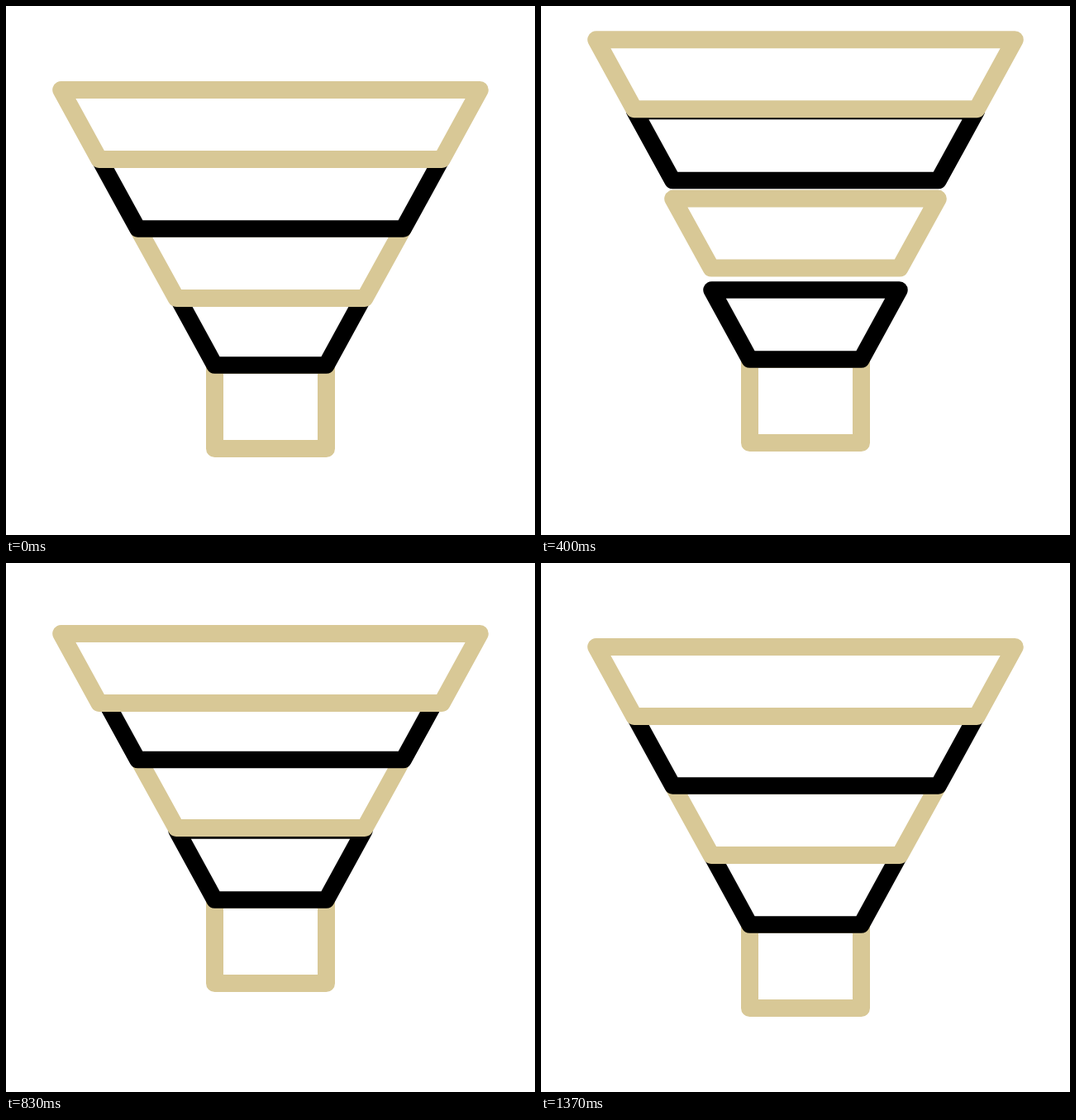
Recreate the animation shown at these times as an HTML page. Size 640 by 640 pixels, loop 1670 ms.

```html
<!DOCTYPE html>
<html lang="en">
<head>
<meta charset="utf-8">
<title>Bouncing funnel</title>
<style>
  html, body { margin: 0; width: 100%; height: 100%; overflow: hidden; background: #fff; }
  svg { display: block; width: 100%; height: 100%; }
  path { fill: #fff; stroke-linejoin: round; }
</style>
</head>
<body>
<svg id="stage" viewBox="0 0 640 640"></svg>
<script>
const LOOP = 1670, FRAME = 100 / 3;
const TAN = '#d8c896', BLACK = '#000';

// Painted bottom to top: half widths and heights of each section, delay in frames
const sections = [
  { top: 67.5, bottom: 67.5, y: 437.5, h: 101, color: TAN, delay: 0 },
  { top: 113.5, bottom: 67.5, y: 353.5, h: 84, color: BLACK, delay: 0 },
  { top: 160.3, bottom: 114, y: 269.5, h: 84, color: TAN, delay: 1.3 },
  { top: 206.8, bottom: 160.7, y: 185.4, h: 84, color: BLACK, delay: 3.3 },
  { top: 253.3, bottom: 207.3, y: 101.5, h: 84, color: TAN, delay: 5.7 }
];

// Two hops, the second half as high: [frame, offset]
const hops = [
  [-1.2, 0], [0, -3], [2.3, -6.8], [4.7, -43.5], [6.3, -60.8], [7.3, -64],
  [8, -62.8], [8.7, -58.3], [10.3, -44], [10.7, -36.4], [12, -10], [12.7, -6.3],
  [14.6, 1.3], [16, -2.5], [19.3, -16], [21.7, -31.3], [22.8, -34], [23.7, -33],
  [25, -30], [25.3, -28.2], [27.7, -13], [29.7, -4.3], [31, -0.5], [35.3, 0]
];

const slope = i => (hops[i + 1][1] - hops[i][1]) / (hops[i + 1][0] - hops[i][0]);

// Monotone tangents keep the curve from overshooting its points
const tangents = hops.map((_, i) => {
  if (i === 0 || i === hops.length - 1) return 0;
  const a = slope(i - 1), b = slope(i);
  return a * b <= 0 ? 0 : 2 * a * b / (a + b);
});

function offset(t) {
  const last = hops.length - 1;
  if (t <= hops[0][0] || t >= hops[last][0]) return 0;
  let i = 0;
  while (t > hops[i + 1][0]) i++;
  const [t0, y0] = hops[i], [t1, y1] = hops[i + 1];
  const d = t1 - t0, u = (t - t0) / d, v = 1 - u;
  return v * v * (1 + 2 * u) * y0 + u * v * v * d * tangents[i]
       + u * u * (3 - 2 * u) * y1 - u * u * v * d * tangents[i + 1];
}

const stage = document.getElementById('stage');
for (const s of sections) {
  s.node = document.createElementNS('http://www.w3.org/2000/svg', 'path');
  const left = 320 - s.top, right = 320 + s.top, end = s.y + s.h;
  s.node.setAttribute('d',
    `M${left} ${s.y}H${right}L${320 + s.bottom} ${end}H${320 - s.bottom}Z`);
  s.node.setAttribute('stroke', s.color);
  s.node.setAttribute('stroke-width', s.color === TAN ? 21 : 20.5);
  stage.append(s.node);
}

function render(ms) {
  const frame = Math.floor((ms % LOOP + 5) / FRAME) % 50;
  for (const s of sections) {
    s.node.setAttribute('transform', `translate(0 ${offset(frame - s.delay).toFixed(2)})`);
  }
}

let start;
function tick(now) {
  start ??= now;
  render(now - start);
  requestAnimationFrame(tick);
}
render(0);
requestAnimationFrame(tick);
</script>
</body>
</html>
```
